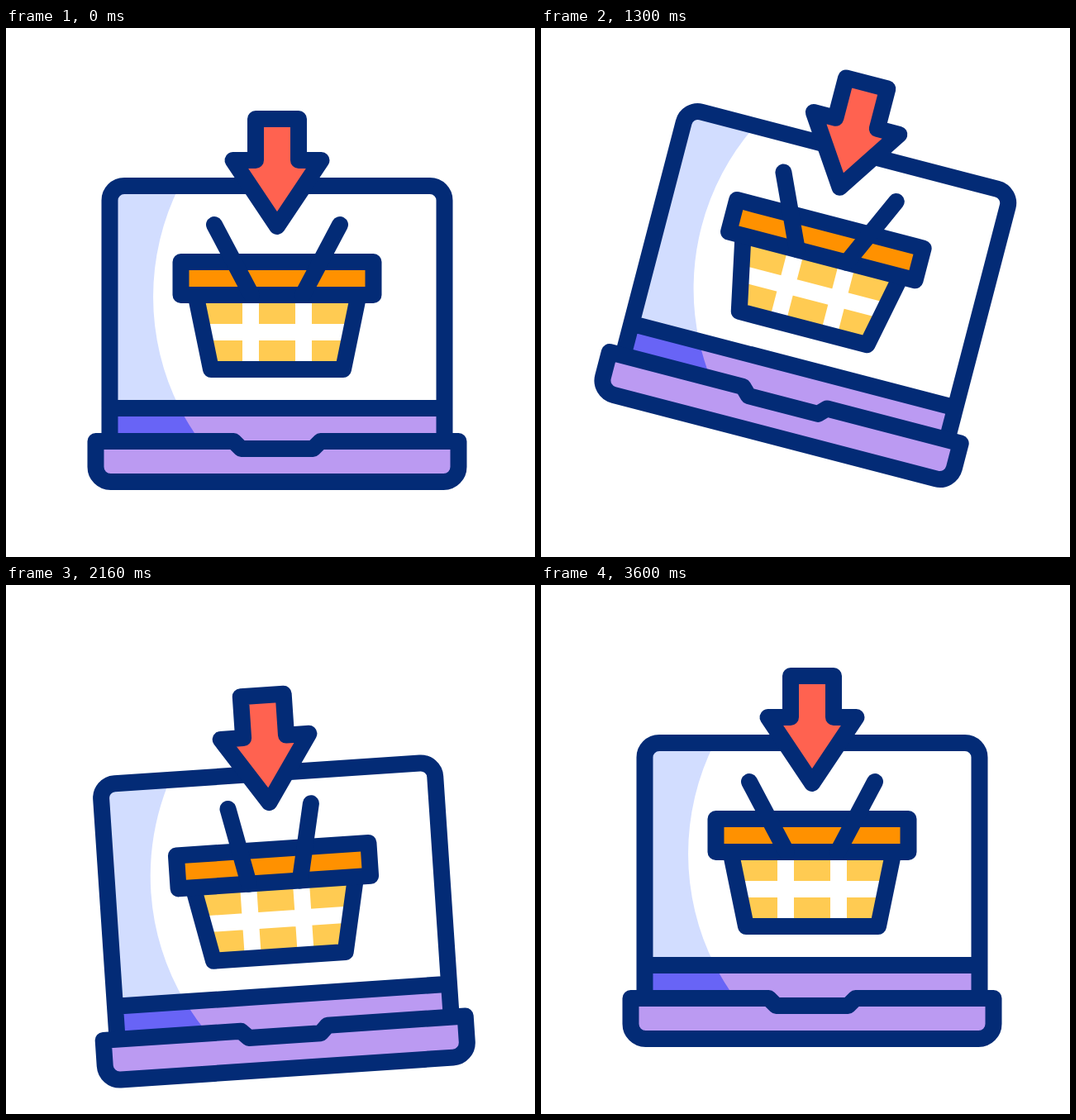
Write an HTML page that moves like this. It is 640x640 px and loops after 3620 ms.

```html
<!DOCTYPE html>
<html lang="en">
<head>
<meta charset="utf-8">
<title>Add to basket</title>
<style>
  html, body { margin: 0; width: 100%; height: 100%; overflow: hidden; background: #fff; }
  svg { display: block; width: 100%; height: 100%; }
  .line { stroke: #032b76; stroke-width: 20; stroke-linecap: round; stroke-linejoin: round; }
</style>
</head>
<body>
<svg viewBox="0 0 640 640" fill="none">
  <g id="laptop">
    <!-- screen -->
    <path fill="#d2ddff" d="M126 191H210A298 298 0 0 0 210.3 460H126Z"/>
    <path fill="#bb9af2" d="M126 460H530V500H126Z"/>
    <path fill="#6864f6" d="M126 460H210.3A298 298 0 0 0 235 500H126Z"/>
    <path class="line" d="M125.5 500V208.5A17.5 17.5 0 0 1 143 191H513A17.5 17.5 0 0 1 530.5 208.5V500M125.5 460H530.5"/>
    <!-- base -->
    <path class="line" fill="#bb9af2" d="M108.5 500H275.5L284.5 509H371.5L380.5 500H547.5V531A18 18 0 0 1 529.5 549H126.5A18 18 0 0 1 108.5 531Z"/>
    <!-- basket -->
    <path fill="#ffcb52" d="M229.5 323H426.5L408 413H248Z"/>
    <path stroke="#fff" stroke-width="20" d="M296 323V413M360 323V413M235 368H421"/>
    <path class="line" d="M229.5 323L248 413H408L426.5 323"/>
    <path class="line" fill="#ff9100" d="M211.5 283H444.5V323H211.5Z"/>
    <path class="line" id="handles"/>
    <path class="line" id="arrow" fill="#ff6250" d="M302 110H354V160H381.5L328 240L274.5 160H302Z"/>
  </g>
</svg>
<script>
  const LOOP = 3620;
  const CX = 328, CY = 370;
  const TILT = [0, 15, -6, 0];
  const SHIFT = [0, -50.5, 46.5, 0];
  const LIFT = [0, 1, 0, 1, 0, 1, 0];

  const [laptop, handles, arrow] =
    ["laptop", "handles", "arrow"].map(id => document.getElementById(id));

  const mix = (a, b, k) => a + (b - a) * k;

  // Evenly spaced keys, eased in and out, held after the last one.
  function track(keys, step, t) {
    const i = Math.min(Math.floor(t / step), keys.length - 2);
    const u = Math.min(t / step - i, 1);
    return mix(keys[i], keys[i + 1], u * u * (3 - 2 * u));
  }

  function draw(t) {
    const lift = track(LIFT, 600, t);
    const dx = mix(76, 2.5, lift);
    const y = mix(238, 217.5, lift);
    laptop.setAttribute("transform",
      `translate(0 ${track(SHIFT, 1200, t)}) rotate(${track(TILT, 1200, t)} ${CX} ${CY})`);
    arrow.setAttribute("transform", `translate(0 ${-39 * lift})`);
    handles.setAttribute("d",
      `M${CX - dx} ${y}L${CX - 31} 323M${CX + dx} ${y}L${CX + 31} 323`);
  }

  const start = performance.now();
  function tick() {
    draw((performance.now() - start) % LOOP);
    requestAnimationFrame(tick);
  }
  tick();
</script>
</body>
</html>
```
